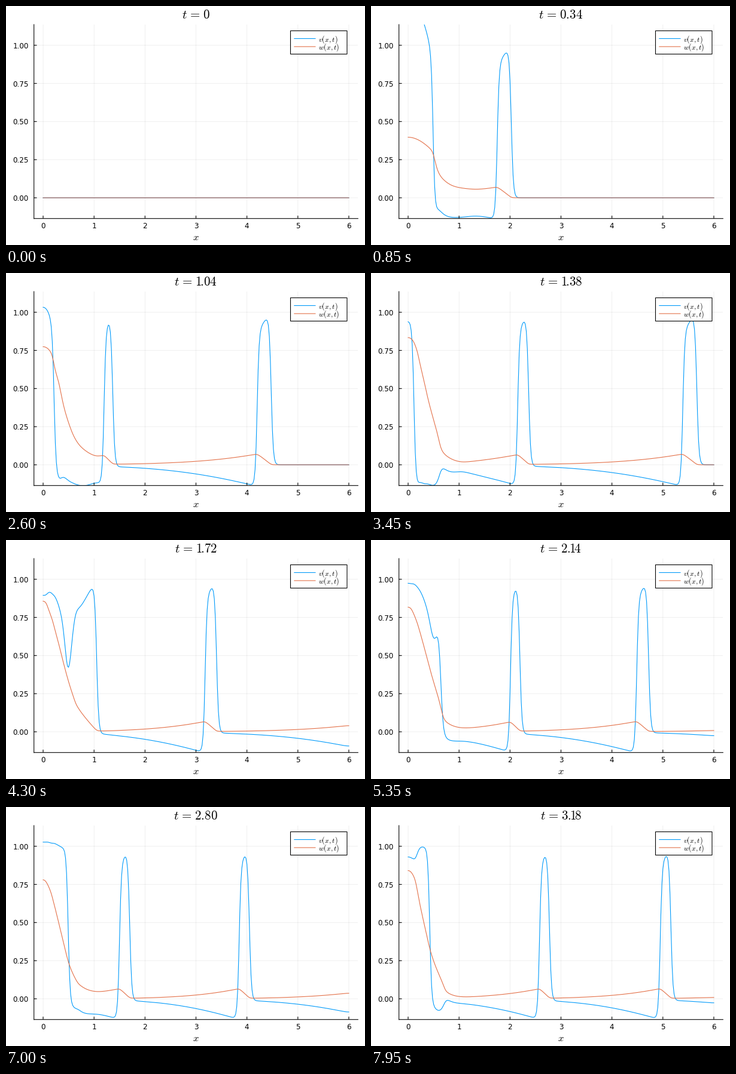
A matplotlib script for the animation above (8000 ms loop, 600 by 400 pixels).

```python
import numpy as np
import matplotlib.pyplot as plt
from matplotlib.animation import FuncAnimation
from matplotlib.patches import Rectangle

plt.rcParams["font.family"] = "DejaVu Sans"
plt.rcParams["mathtext.fontset"] = "cm"

W, H, DPI = 600, 400, 100
PX = 72 / DPI                      # points per pixel
BLUE, ORANGE = "#009afa", "#e36f47"
FRAMES, INTERVAL, DT = 160, 50, 0.02

# FitzHugh-Nagumo cable with a Gaussian stimulus at its left end
DIFF, RATE, THRESH = 0.2, 1000.0, 0.3
x = np.linspace(0, 6, 301)
h = x[1] - x[0]
stimulus = 0.8 * np.exp(-5 * x**2)


def slope(u):
    v, w = u
    lap = np.empty_like(v)
    lap[1:-1] = v[2:] - 2 * v[1:-1] + v[:-2]
    lap[0] = 2 * (v[1] - v[0])
    lap[-1] = 2 * (v[-2] - v[-1])
    react = v * (v - THRESH) * (1 - v) - w + stimulus
    return np.array([DIFF / h**2 * lap + RATE * react, v - w])


def solve(substeps=80):
    dt = DT / substeps
    u = np.zeros((2, x.size))
    states = [u]
    for _ in range(FRAMES - 1):
        for _ in range(substeps):
            a = slope(u)
            b = slope(u + dt / 2 * a)
            c = slope(u + dt / 2 * b)
            d = slope(u + dt * c)
            u = u + dt / 6 * (a + 2 * b + 2 * c + d)
        states.append(u)
    return states


states = solve()

fig = plt.figure(figsize=(W / DPI, H / DPI), dpi=DPI, facecolor="white")

left, right, top, bottom = 46.7, 588.3, 31.0, 355.7
ax = fig.add_axes([left / W, 1 - bottom / H, (right - left) / W, (bottom - top) / H])
ax.set_xlim(-0.18, 6.18)
ax.set_ylim(-0.136, 1.136)
ax.set_xticks(range(7))
ax.set_yticks([0, 0.25, 0.5, 0.75, 1], ["0.00", "0.25", "0.50", "0.75", "1.00"])
ax.tick_params(length=0, labelsize=12 * PX)
ax.tick_params(axis="x", pad=6.2 * PX)
ax.tick_params(axis="y", pad=8.7 * PX)
ax.grid(color="black", alpha=0.08, linewidth=0.8 * PX)
ax.set_axisbelow(True)
ax.spines[["top", "right"]].set_visible(False)
ax.spines[["left", "bottom"]].set_linewidth(1.1 * PX)
for part in (*ax.get_xgridlines(), *ax.get_ygridlines(), *ax.spines.values()):
    part.set_snap(False)

curves = [ax.plot([], [], color=c, lw=1.1 * PX, snap=False)[0] for c in (BLUE, ORANGE)]

# Ticks and legend, laid out in pixels
board = fig.add_axes([0, 0, 1, 1], zorder=5)
board.set_xlim(0, W)
board.set_ylim(H, 0)
board.axis("off")


def line(xs, ys, color="black"):
    board.plot(xs, ys, color=color, lw=1.1 * PX, snap=False, solid_capstyle="butt")


def label(px, py, text, size, ha="center"):
    return fig.text(px / W, 1 - py / H, text, fontsize=size * PX, ha=ha,
                    va="baseline", color="black", zorder=12)


for k in range(7):
    px = left + (k + 0.18) / 6.36 * (right - left)
    line([px, px], [bottom, bottom - 4.8])
for k in range(5):
    py = bottom - (k / 4 + 0.136) / 1.272 * (bottom - top)
    line([left, left + 4.8], [py, py])

board.add_patch(Rectangle((475.5, 41.5), 94.5, 39, fc="white", ec="black",
                          lw=1.1 * PX, snap=False, zorder=1))
for py, base, color, name in ((54.5, 59.4, BLUE, "v"), (68.0, 72.6, ORANGE, "w")):
    line([481.3, 517.5], [py, py], color)
    label(522.4, base, f"${name}(x,t)$", 12, ha="left")

label(317.3, 392.3, "$x$", 16.5)
title = label(317.3, 21.4, "", 21)


def kerned(number):
    """Set the point without its trailing space and tighten around each 1."""
    out = number[0]
    for a, b in zip(number, number[1:]):
        gap = -0.12 * ("1" in a + b) - 0.2 * (a == ".")
        out += rf"\hspace{{{gap:.2f}}}{b}"
    return out


def draw(i):
    for curve, y in zip(curves, states[i]):
        curve.set_data(x, y)
    time = kerned(f"{i * DT:.2f}") if i else "0"
    title.set_text(rf"$t\hspace{{0.11}}=\hspace{{0.11}}{time}$")
    return [*curves, title]


anim = FuncAnimation(fig, draw, frames=FRAMES, interval=INTERVAL, repeat=True,
                     repeat_delay=0, init_func=lambda: draw(0))
plt.show()
```
